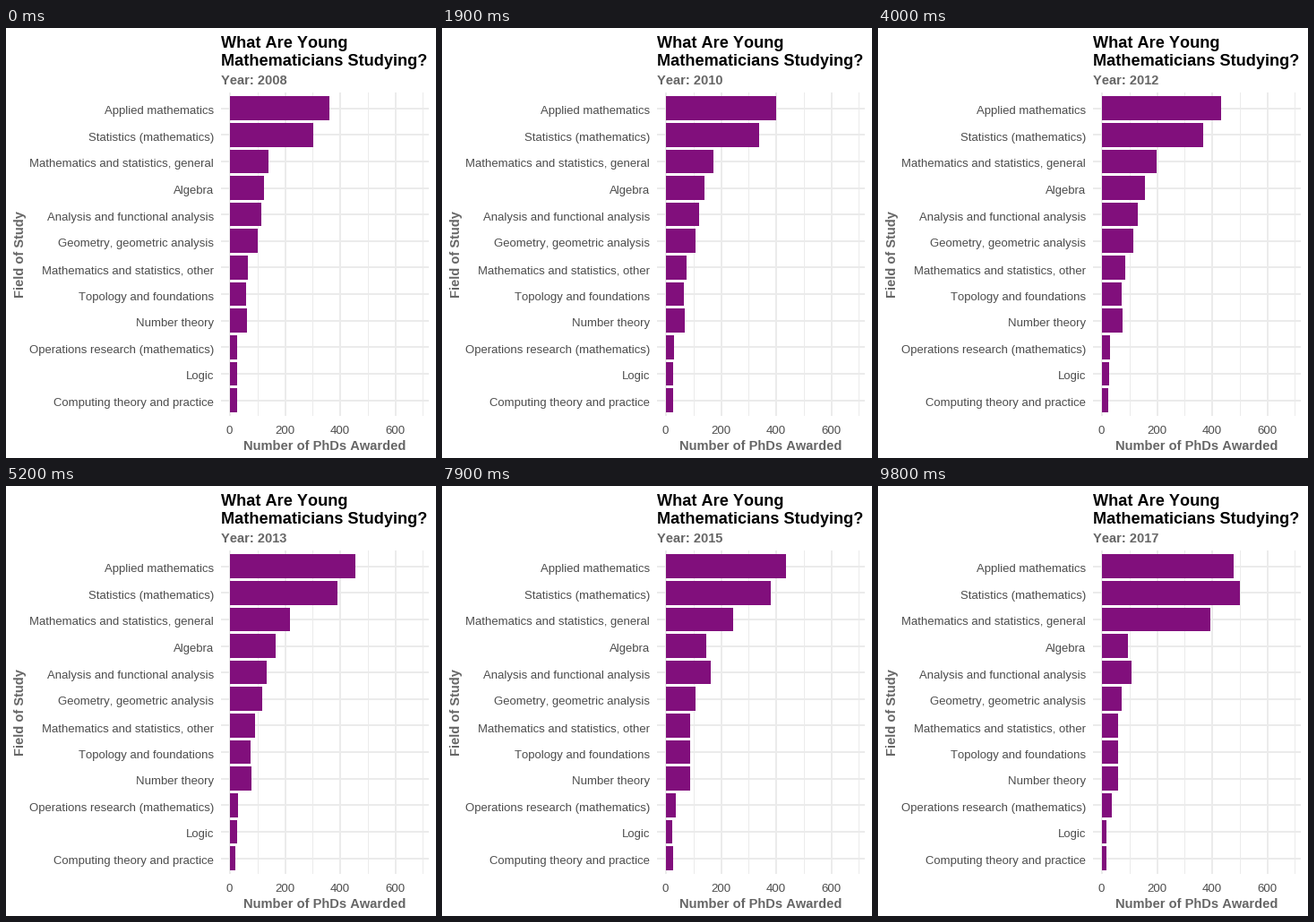
Write a matplotlib script that moves like this. It is 480x480 px and loops after 10000 ms.

```python
import matplotlib.pyplot as plt
from matplotlib.animation import FuncAnimation
from matplotlib.patches import Rectangle

SIZE, DPI = 480, 100
FRAMES, INTERVAL = 100, 100
FIRST_YEAR, PEAK_YEAR = 2008, 2014
STARTS = [2, 12, 23, 35, 45, 57, 68, 78, 90]
TWEEN = 8

X0, X_UNIT = 249.95, 0.3078
Y0, ROW = 89.59, 29.64
PANEL = (240, 472, 72, 433)
GRID, BAR = "#EBEBEB", "#810F7C"
LABEL, HEADING = "#4D4D4D", "#666666"

# PhDs awarded in 2008, 2014 and 2015, then 2016 and 2017 where they
# do not follow the general drop
KEY_COUNTS = {
    "Applied mathematics": (361, 474, 435, 474, 478),
    "Statistics (mathematics)": (302, 406, 380, 267, 500),
    "Mathematics and statistics, general": (140, 234, 241, 685, 393),
    "Algebra": (124, 176, 147),
    "Analysis and functional analysis": (114, 137, 163),
    "Geometry, geometric analysis": (101, 121, 108),
    "Mathematics and statistics, other": (65, 95, 88),
    "Topology and foundations": (59, 79, 88),
    "Number theory": (62, 82, 88),
    "Operations research (mathematics)": (27, 30, 36, 46, 36),
    "Logic": (27, 27, 23),
    "Computing theory and practice": (27, 20, 27),
}
DROP_2016, DROP_2017 = 0.57, 0.65

plt.rcParams["font.family"] = "Liberation Sans"
plt.rcParams["text.kerning_factor"] = 6
fig = plt.figure(figsize=(SIZE / DPI, SIZE / DPI), dpi=DPI, facecolor="white")
ax = fig.add_axes([0, 0, 1, 1])
ax.set(xlim=(0, SIZE), ylim=(SIZE, 0))
ax.axis("off")


def yearly_counts(first, peak, after, *recent):
    """Steady growth up to the peak year, then the last three years."""
    span = PEAK_YEAR - FIRST_YEAR
    growth = [first + (peak - first) * i / span for i in range(span + 1)]
    return growth + [after, *(recent or (after * DROP_2016, after * DROP_2017))]


def rect(x, y, w, h, color, z=1):
    patch = Rectangle((x, y), w, h, facecolor=color, linewidth=0,
                      antialiased=False, zorder=z)
    return ax.add_patch(patch)


def text(x, y, s, px, color, ha="left", weight="normal", **kw):
    return ax.text(x, y, s, fontsize=px * 72 / DPI, color=color, ha=ha,
                   va="baseline", weight=weight, **kw)


def draw_grid():
    left, right, top, bottom = PANEL
    for value in range(0, 800, 100):
        x = X0 + value * X_UNIT
        if value % 200:
            rect(round(x), top, 1, bottom - top, GRID)
        else:
            rect(round(x) - 1, top, 2, bottom - top, GRID)
            text(x - 0.6, 453, str(value), 13.3, LABEL, "center")
    for i, field in enumerate(KEY_COUNTS):
        y = Y0 + i * ROW
        rect(left, round(y) - 1, right - left, 2, GRID)
        text(232, round(y + 6.45), field, 13.15, LABEL, "right")


def ease(t):
    return 4 * t ** 3 if t < 0.5 else 1 - 4 * (1 - t) ** 3


def state_at(frame):
    """Return the index of the year being left, and the linear progress."""
    index = max([i for i, s in enumerate(STARTS) if frame >= s], default=0)
    return index, min(max((frame - STARTS[index]) / TWEEN, 0), 1)


draw_grid()
text(239.5, 22, "What Are Young", 18.2, "black", weight="bold")
text(239.5, 42, "Mathematicians Studying?", 18.2, "black", weight="bold")
text(355.5, 471, "Number of PhDs Awarded", 14.6, HEADING, "center", "bold")
text(20, 252.5, "Field of Study", 14.6, HEADING, "center", "bold",
     rotation=90, rotation_mode="anchor")
year_label = text(240, 63, "", 14.6, HEADING, weight="bold")

counts = [yearly_counts(*keys) for keys in KEY_COUNTS.values()]
bars = [rect(X0, Y0 + (i - 0.45) * ROW, 0, 0.9 * ROW, BAR, 2)
        for i in range(len(counts))]


def update(frame):
    index, t = state_at(frame)
    for bar, series in zip(bars, counts):
        a, b = series[index:index + 2]
        bar.set_width((a + (b - a) * ease(t)) * X_UNIT)
    year_label.set_text(f"Year: {FIRST_YEAR + index + (t > 0.5)}")
    return [*bars, year_label]


anim = FuncAnimation(fig, update, frames=FRAMES, interval=INTERVAL,
                     repeat=True, repeat_delay=0)
plt.show()
```
